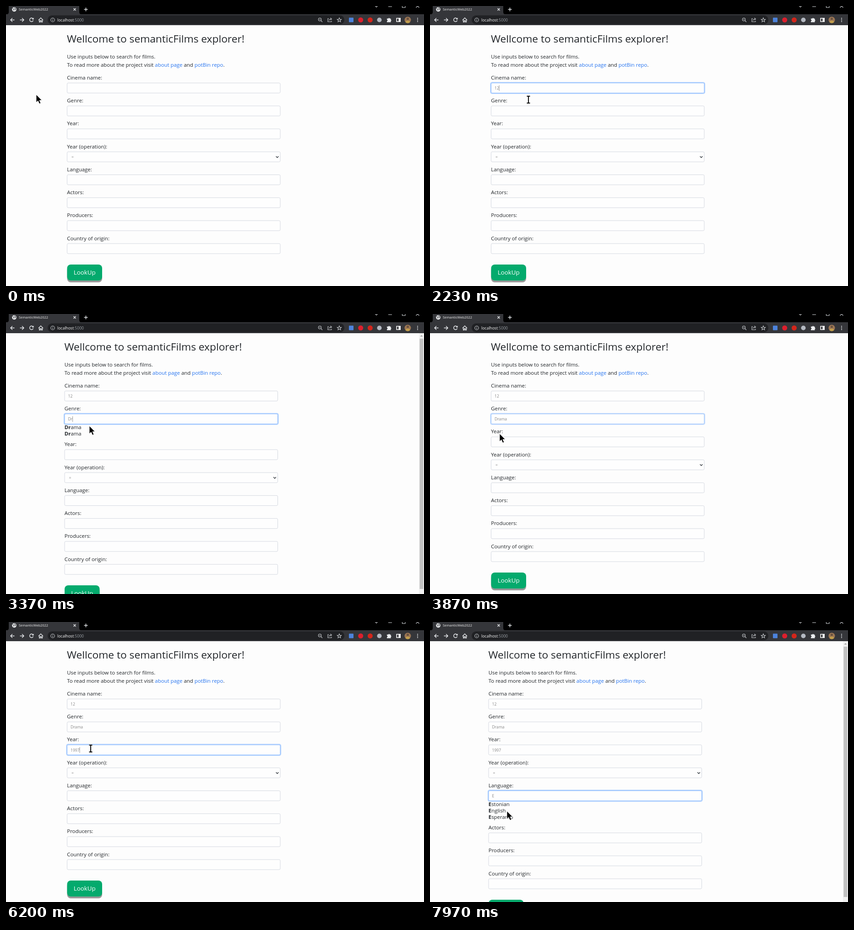
An HTML page that plays this animation: 913 px wide and 613 px high, repeating every 8 s.

```html
<!DOCTYPE html>
<html lang="en">
<head>
<meta charset="utf-8">
<title>Film search form</title>
<style>
  html, body { margin: 0; width: 100%; height: 100%; overflow: hidden; background: #fdfdfd; }
  svg { display: block; font-family: "Open Sans", "Noto Sans", sans-serif; }
  .body { font-size: 11.4px; fill: #212529; }
  .value { font-size: 8.6px; fill: #858585; }
  .link { fill: #2674f0; }
  .bold { font-weight: 700; }
  .line { fill: none; stroke: #e8eaed; stroke-width: 1.4; }
  .thin { fill: none; stroke: #c4c7cb; stroke-width: 1.1; }
</style>
</head>
<body>
<svg id="stage" width="913" height="613" viewBox="0 0 913 613">
  <rect width="913" height="613" fill="#fdfdfd"/>
  <g id="page">
    <text x="133" y="80" font-size="22.7" fill="#212529">Wellcome to semanticFilms explorer!</text>
    <text class="body" x="133.3" y="114.5">Use inputs below to search for films.</text>
    <text class="body" x="133.3" y="132.5">To read more about the project visit <tspan class="link">about page</tspan> and <tspan class="link">potBin repo</tspan>.</text>
    <g id="fields"></g>
    <g id="button">
      <rect x="133.5" y="570" width="76.5" height="35" rx="8" fill="#999"/>
      <rect x="133.5" y="566" width="76.5" height="35" rx="8" fill="#04aa6d"/>
      <text x="147.7" y="588.3" font-size="13.4" fill="#fff">LookUp</text>
    </g>
  </g>

  <g id="scrollbar">
    <rect x="902" y="42" width="11" height="571" fill="#f1f1f1"/>
    <rect x="903.5" y="54" width="8" height="548" fill="#c1c1c1"/>
    <path d="M904.5 49.5L907.5 46L910.5 49.5Z" fill="#a8a8a8"/>
  </g>

  <g id="browser">
    <rect width="913" height="19" fill="#000"/>
    <rect y="18" width="913" height="24" fill="#35363a"/>
    <path d="M2 18Q6 18 6 13V0H160V13Q160 18 164 18Z" fill="#35363a"/>
    <circle cx="18" cy="7.5" r="4.8" fill="#eceef0"/>
    <path d="M14.5 5.5L17.5 7L16.5 10M18.5 4L21 6.5L19.5 9" fill="none" stroke="#35363a" stroke-width="1.2"/>
    <text x="28" y="10.3" font-size="7.4" fill="#eee">SemanticWeb2022</text>
    <path class="line" d="M147.5 5L152.5 10M152.5 5L147.5 10M170.5 7.5H178.5M174.5 3.5V11.5"/>
    <path class="thin" d="M806.5 0L809 2.5L811.5 0M835 1.5H843M865.5 0V3.5H872V0M895.5 3.5L899 0L902.5 3.5"/>

    <path class="line" d="M18.5 30.5H10.5M14 26.5L10 30.5L14 34.5M30.5 30.5H38.5M35 26.5L39 30.5L35 34.5"/>
    <path class="line" d="M59 28A4 4 0 1 0 59.5 31.5"/>
    <path d="M60.5 25.5V29.5H56.5Z" fill="#e8eaed"/>
    <path class="line" d="M71 31L76 26L81 31M72.7 30V35H75V32H77.2V35H79.5V30"/>
    <rect x="91" y="20.5" width="648" height="19.5" rx="9.75" fill="#202124"/>
    <circle class="thin" cx="102" cy="30.5" r="4.2"/>
    <path class="thin" d="M102 30V33M102 28V29"/>
    <text x="112" y="33.5" font-size="8.6" fill="#9aa0a6"><tspan fill="#fff">localhost</tspan>:5000</text>
    <circle class="thin" cx="685.5" cy="29.5" r="3.2"/>
    <path class="thin" d="M688 32L691 35M684 29.5H687"/>
    <path class="thin" d="M705 27.5H703V34.5H711V32.5M705.5 32Q706 28.5 710 28.5M708.5 25.8L711.5 28.5L708.5 31.2"/>
    <path class="thin" id="star"/>
    <rect x="749" y="25.5" width="10" height="10" rx="1" fill="#4c83dc"/>
    <circle cx="774.7" cy="30.5" r="5.5" fill="#dd1f2d"/>
    <circle cx="795.4" cy="30.5" r="5.5" fill="#d3261b"/>
    <circle cx="815.5" cy="30.5" r="5" fill="#b4b9c2"/>
    <path d="M832 27.5H835A1.7 1.7 0 0 1 838.3 27.5H840.5V30A1.6 1.6 0 0 1 840.5 33V35.5H832V33A1.5 1.5 0 0 0 832 30Z" fill="#eceef0"/>
    <path d="M852.5 26H862V35H852.5ZM854 27.5V33.5H857.5V27.5Z" fill="#fff" fill-rule="evenodd"/>
    <circle cx="877.5" cy="30.5" r="7" fill="#9c7654"/>
    <path d="M872.5 35.4A5.2 4.8 0 0 1 882.5 35.4A7 7 0 0 1 872.5 35.4Z" fill="#c3a04c"/>
    <circle cx="877.5" cy="28" r="2.5" fill="#66503f"/>
    <path d="M899 26V27.8M899 29.6V31.4M899 33.2V35" stroke="#e8eaed" stroke-width="1.8"/>
  </g>

  <path id="arrow" d="M0 0V17L4 13.5L6.8 20L9.8 18.7L7 12.5H12.2Z" fill="#000" stroke="#fff" stroke-width=".8"/>
  <g id="beam" fill="none">
    <path d="M-3.5 -7.5H3.5M0 -7.5V7.5M-3.5 7.5H3.5" stroke="#fff" stroke-width="3"/>
    <path d="M-3.5 -7.5H3.5M0 -7.5V7.5M-3.5 7.5H3.5" stroke="#000" stroke-width="1.9"/>
  </g>
</svg>
<script>
const LOOP = 8000, PITCH = 50.23, LINE = 14, FADE = 150;
const CINEMA = 0, GENRE = 1, YEAR = 2, OPERATION = 3, LANGUAGE = 4;
const labels = ["Cinema name", "Genre", "Year", "Year (operation)", "Language", "Actors", "Producers", "Country of origin"];

const focuses = [
  { field: CINEMA, from: 640, to: 2600 },
  { field: GENRE, from: 2600, to: 3850 },
  { field: YEAR, from: 4430, to: 7050 },
  { field: LANGUAGE, from: 7050, to: 9000 }
];
const edits = [
  [1850, CINEMA, "1"], [2000, CINEMA, "12"],
  [2950, GENRE, "D"], [3200, GENRE, "Dr"], [3850, GENRE, "Drama"],
  [5000, YEAR, "1"], [5530, YEAR, "19"], [5750, YEAR, "199"], [6020, YEAR, "1997"],
  [7400, LANGUAGE, "E"]
];
const menus = [
  { field: GENRE, from: 2950, to: 3850, items: ["Drama", "Drama"] },
  { field: LANGUAGE, from: 7400, to: 9000, items: ["Estonian", "English", "Esperanto"] }
];
// time, x, y of the pointer's hot spot
const path = [
  [30, 66, 194], [580, 248, 183], [1500, 248, 183], [2050, 215, 205], [2230, 215, 205],
  [2550, 200, 229], [2850, 200, 229], [3300, 182, 245], [3420, 182, 245], [3750, 152, 262],
  [3880, 152, 262], [4200, 163, 277], [4400, 165, 279], [4800, 165, 279], [5150, 185, 277],
  [6470, 185, 277], [6980, 172, 382], [7300, 172, 382], [7850, 168, 414]
];
const arrowTimes = [[0, 430], [3000, 4120], [7560, LOOP]];

const $ = id => document.getElementById(id);
const clamp = v => Math.max(0, Math.min(1, v));
const show = (el, on) => el.setAttribute("display", on ? "inline" : "none");
const move = (el, x, y) => el.setAttribute("transform", `translate(${x} ${y})`);

function add(parent, tag, attrs, text = "") {
  const el = document.createElementNS("http://www.w3.org/2000/svg", tag);
  for (const key in attrs) el.setAttribute(key, attrs[key]);
  el.textContent = text;
  return parent.appendChild(el);
}

const fields = labels.map((label, i) => {
  const group = add($("fields"), "g", {});
  add(group, "text", { class: "body", x: 133.3, y: 161 }, label + ":");
  const ring = add(group, "rect", { x: 132.4, y: 167.4, width: 467.7, height: 24.2, rx: 3.2, fill: "none", stroke: "#b6d4fe", "stroke-width": 2 });
  const box = add(group, "rect", { x: 133.5, y: 168.5, width: 465.5, height: 22, rx: 2.5, fill: "#fefefe" });
  const value = add(group, "text", { class: "value", x: i === OPERATION ? 143 : 141, y: 183.1 });
  const caret = add(group, "path", { stroke: "#8c8c8c", "stroke-width": .9 });
  if (i === OPERATION) {
    value.textContent = "=";
    add(group, "path", { d: "M589.7 178.3L592.5 181.2L595.3 178.3", fill: "none", stroke: "#343a40", "stroke-width": 1.4 });
  }
  return { group, ring, box, value, caret };
});

for (const menu of menus) {
  menu.group = add(fields[menu.field].group, "g", {});
  menu.rows = menu.items.map((item, i) => {
    const row = add(menu.group, "text", { class: "body", x: 133.3, y: 201.8 + i * LINE });
    return { item, head: add(row, "tspan", { class: "bold" }), tail: add(row, "tspan", {}) };
  });
}

$("star").setAttribute("d", "M" + Array.from({ length: 10 }, (_, i) => {
  const r = i % 2 ? 2.1 : 4.9, a = i * Math.PI / 5;
  return `${(728 + r * Math.sin(a)).toFixed(2)} ${(30.8 - r * Math.cos(a)).toFixed(2)}`;
}).join("L") + "Z");

function pointerAt(t) {
  const next = path.findIndex(p => p[0] > t);
  if (next < 1) return (next ? path[path.length - 1] : path[0]).slice(1);
  const [t0, x0, y0] = path[next - 1], [t1, x1, y1] = path[next];
  const u = (t - t0) / (t1 - t0), e = u * u * (3 - 2 * u);
  return [x0 + (x1 - x0) * e, y0 + (y1 - y0) * e];
}

function drawField(field, i, t, y) {
  move(field.group, 0, y);
  const typed = edits.filter(e => e[1] === i && e[0] <= t).pop();
  const text = typed ? typed[2] : "";
  if (i !== OPERATION) field.value.textContent = text;

  const focus = focuses.find(f => f.field === i);
  const glow = focus ? clamp((t - focus.from) / FADE) - clamp((t - focus.to) / FADE) : 0;
  field.ring.setAttribute("opacity", glow * glow);
  const mix = (a, b) => Math.round(a + (b - a) * glow);
  field.box.setAttribute("stroke", `rgb(${mix(212, 134)},${mix(216, 183)},${mix(224, 254)})`);

  const active = focus && t >= focus.from && t < focus.to;
  const since = active ? t - Math.max(focus.from, typed ? typed[0] : 0) : 0;
  show(field.caret, active && since % 1000 < 500);
  if (active) {
    const x = 141.3 + (text ? field.value.getComputedTextLength() : 0);
    field.caret.setAttribute("d", `M${x} 173.5V186`);
  }
  return text;
}

function draw(t) {
  let drop = 0;
  const open = menus.find(m => t >= m.from && t < m.to);
  fields.forEach((field, i) => {
    const text = drawField(field, i, t, i * PITCH + drop);
    const menu = menus.find(m => m.field === i);
    if (!menu) return;
    show(menu.group, menu === open);
    if (menu !== open) return;
    drop += menu.items.length * LINE;
    for (const row of menu.rows) {
      row.head.textContent = row.item.slice(0, text.length);
      row.tail.textContent = row.item.slice(text.length);
    }
  });
  move($("button"), 0, drop);
  move($("page"), open ? -5.5 : 0, 0);
  show($("scrollbar"), open);

  const [x, y] = pointerAt(t);
  const isArrow = arrowTimes.some(([from, to]) => t >= from && t < to);
  show($("arrow"), isArrow);
  show($("beam"), !isArrow);
  move($(isArrow ? "arrow" : "beam"), x, y);
}

const start = performance.now();
function tick() {
  draw((performance.now() - start) % LOOP);
  requestAnimationFrame(tick);
}
tick();
</script>
</body>
</html>
```
